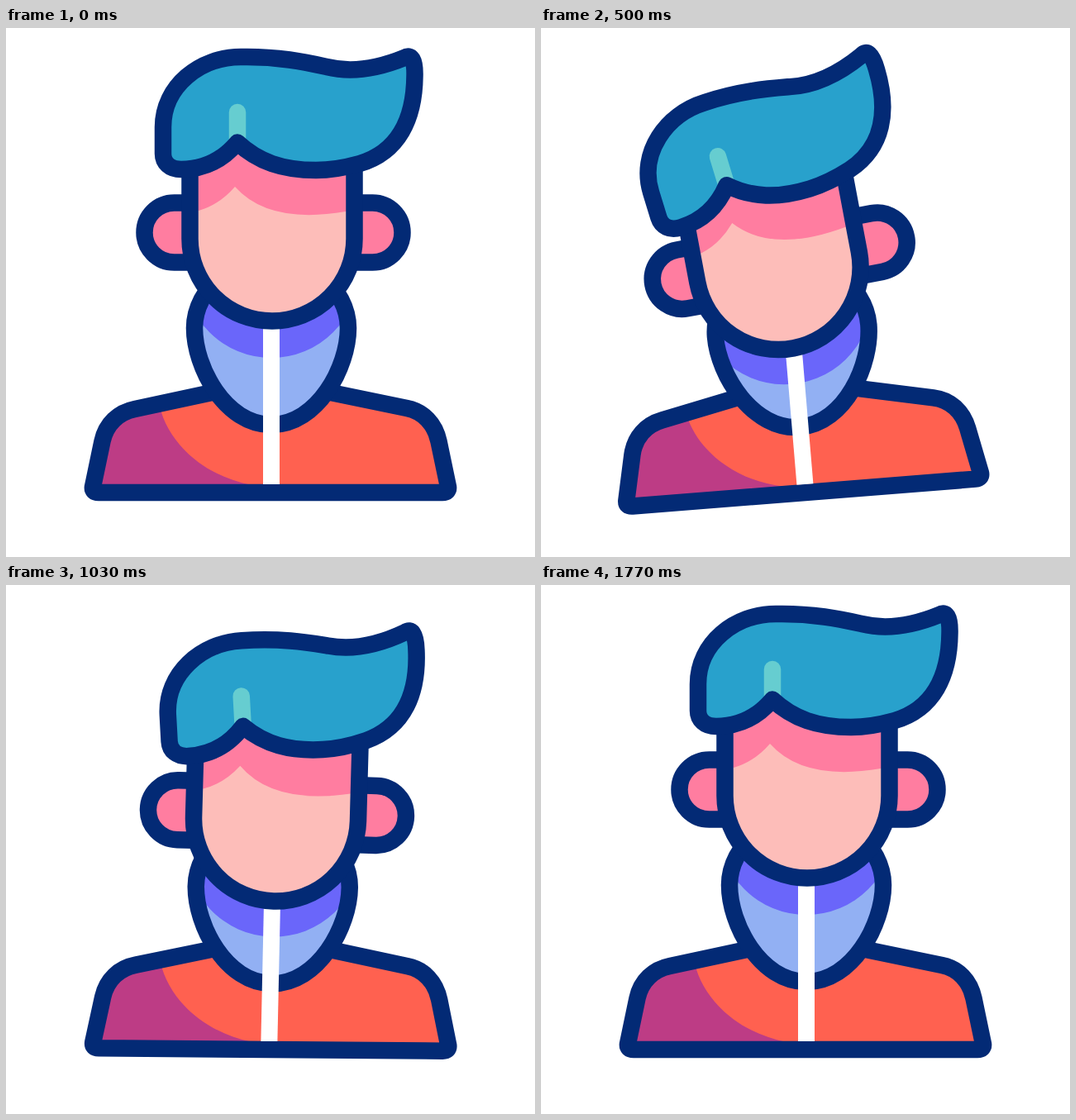
An HTML page for the animation above (2 s loop, 640 by 640 pixels).

```html
<!DOCTYPE html>
<html lang="en">
<head>
<meta charset="utf-8">
<title>Nodding man</title>
<style>
html, body { margin: 0; height: 100%; overflow: hidden; background: #fff; }
svg { display: block; width: 100vw; height: 100vh; }
.line { fill: none; stroke: #032a75; stroke-width: 20.5; stroke-linejoin: round; }
</style>
</head>
<body>
<svg viewBox="0 0 640 640">
  <defs>
    <path id="coat" d="M105 555L116.500 500C121 479 136 465 156 461L254 440H388L485 460C505 464 519 479 523.500 500L535 555Q536 562 528 562H112Q104 562 105 555Z"/>
    <path id="collar" d="M262 300C240 315 228 340 228 363C228 410 265 480 321 480C377 480 414 410 414 363C414 340 402 315 380 300"/>
    <path id="face" d="M222.500 145V255A99.500 99.500 0 0 0 421.500 255V145"/>
    <path id="quiff" d="M190 120C190 70 235 35 284 35C330 34 365 42 388 47C420 55 455 47 482 36C490 31 495 38 494.500 58C494 110 475 150 428 164C410 169 392 172 375 172C335 172 305 162 280 138.500C262 160 240 171 212 171C198 171 190 163 190 152Z"/>
    <clipPath id="inCoat"><use href="#coat"/></clipPath>
    <clipPath id="inCollar"><use href="#collar"/></clipPath>
    <clipPath id="inFace"><use href="#face"/></clipPath>
  </defs>
  <g id="body">
    <use href="#coat" fill="#ff6150"/>
    <path clip-path="url(#inCoat)" fill="#bd3c85" d="M186 458C196 500 236 541 297 553V570H90V440H180Z"/>
    <use href="#coat" class="line"/>
    <g id="neck">
      <use href="#collar" fill="#92b0f3"/>
      <g clip-path="url(#inCollar)">
        <circle id="shade" cx="321" cy="293" r="106" fill="#6a66fa"/>
      </g>
      <use href="#collar" class="line"/>
    </g>
    <path id="zip" fill="#fff"/>
    <g id="head">
      <g class="line" style="fill:#ff7da0">
        <path d="M222 211.500H203.500a36 36 0 0 0 0 72H222"/>
        <path d="M422 211.500H443.500a36 36 0 0 1 0 72H422"/>
      </g>
      <g id="front">
        <use href="#face" fill="#fdbdb9"/>
        <path clip-path="url(#inFace)" fill="#ff7da0" d="M215 225L233 221Q258 214 277 192Q318 238 411 222L430 218V140H215Z"/>
        <use href="#face" class="line"/>
        <g id="hair">
          <use href="#quiff" fill="#28a1cc"/>
          <path d="M280 102V138" stroke="#66cdd0" stroke-width="20.5" stroke-linecap="round"/>
          <use href="#quiff" class="line"/>
        </g>
      </g>
    </g>
  </g>
</svg>
<script>
const $ = id => document.getElementById(id);
const swayTimes = [0, 385, 813, 1225, 1770];
const nodTimes = [0, 390, 780, 1170, 1560];

// Eased value between the keys around time t
function track(t, times, values) {
  const i = times.findIndex(k => k > t);
  if (i < 0) return values.at(-1);
  const u = (t - times[i - 1]) / (times[i] - times[i - 1]);
  return values[i - 1] + (values[i] - values[i - 1]) * u * u * (3 - 2 * u);
}

function move(id, transform) {
  $(id).setAttribute('transform', transform);
}

function draw(now) {
  const t = now % 2000;
  const sway = values => track(t, swayTimes, values);
  const nod = values => track(t, nodTimes, values);

  const lean = sway([0, -6.5, 4.4, -2.85, 0]);
  const tilt = sway([0, -16, 13.6, -8.5, 0]) - lean;
  const dip = nod([0, 40, 0, 39.5, 0]);
  const flop = nod([0, -9.6, 6.8, -9.5, 0]);
  const foot = 321 + sway([0, 2.8, -7, 0.6, 0]);
  const headMove = drop => `translate(0 ${drop}) rotate(${tilt} 323 348)`;

  move('body', `rotate(${lean} 320 585)`);
  move('neck', `translate(0 ${dip * 0.08})`);
  move('shade', headMove(dip * 0.87));
  move('head', headMove(dip));
  move('front', `translate(${tilt * 0.25} 0)`);
  move('hair', `rotate(${flop} 345 152)`);
  $('zip').setAttribute('d', `M311 340H331L${foot + 10} 552H${foot - 10}Z`);
  requestAnimationFrame(draw);
}
draw(0);
</script>
</body>
</html>
```
